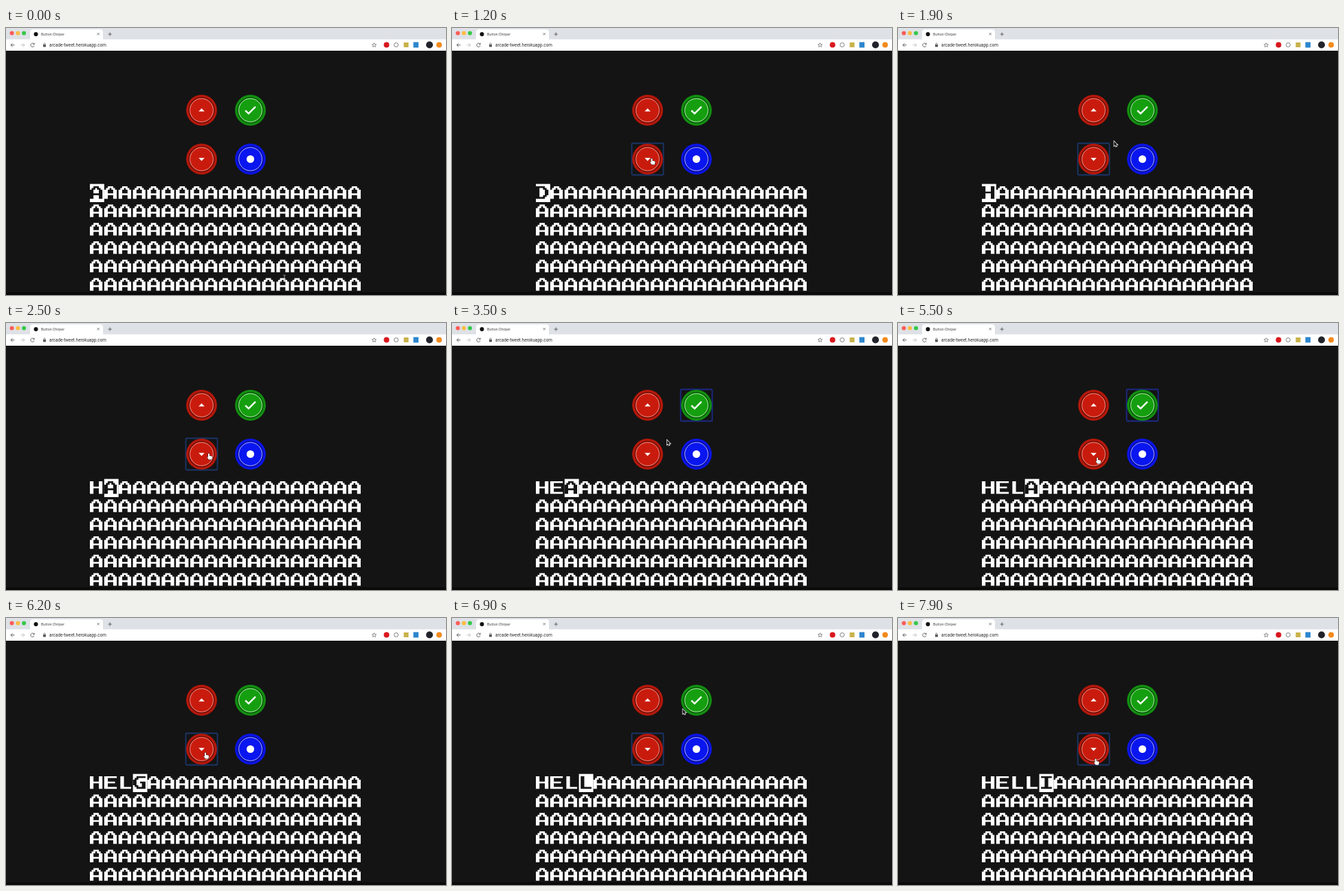
Animation, 640 px wide and 388 px high, one loop 8000 ms. Source, as an HTML page with a canvas:

```html
<!DOCTYPE html>
<html lang="en">
<head>
<meta charset="utf-8">
<title>Button Chirper</title>
<style>
html, body { margin: 0; width: 100%; height: 100%; overflow: hidden; background: #141414; }
canvas { display: block; }
</style>
</head>
<body>
<canvas id="stage" width="640" height="388"></canvas>
<script>
const ctx = document.getElementById('stage').getContext('2d');
const LOOP = 8000, DARK = '#141414';
const COLS = 19, ROWS = 6, CELL = 20.87, LINE = 26.7, DOT = CELL / 8;

// Pixel letters: v is a two-dot-wide stem, h a one-dot-high bar.
const v = (x, y, n) => [x, y, 2, n];
const h = (x, y, n) => [x, y, n, 1];
const parts = {
  A: [h(2,0,3), v(1,1,1), v(4,1,1), v(0,2,5), v(5,2,5), h(2,4,3)],
  B: [v(0,0,7), h(2,0,4), v(5,1,2), h(2,3,4), v(5,4,2), h(2,6,4)],
  C: [h(2,0,4), v(1,1,1), v(5,1,1), v(0,2,3), v(1,5,1), v(5,5,1), h(2,6,4)],
  D: [v(0,0,7), h(2,0,3), v(4,1,1), v(5,2,3), v(4,5,1), h(2,6,3)],
  E: [v(0,0,7), h(2,0,5), h(2,3,4), h(2,6,5)],
  F: [v(0,0,7), h(2,0,5), h(2,3,4)],
  G: [h(2,0,5), v(1,1,1), v(0,2,3), h(4,3,3), v(5,4,2), v(1,5,1), h(2,6,5)],
  H: [v(0,0,7), v(5,0,7), h(2,3,3)],
  I: [h(1,0,6), v(3,1,5), h(1,6,6)],
  J: [v(5,0,6), v(0,5,1), h(1,6,5)],
  K: [v(0,0,7), v(5,0,1), v(4,1,1), v(3,2,1), h(2,3,2), h(2,4,3), h(3,5,3), h(4,6,3)],
  L: [v(1,0,7), h(3,6,4)]
};
const glyphs = {};
for (const name in parts) {
  glyphs[name] = new Path2D();
  for (const r of parts[name]) glyphs[name].rect(...r.map(n => n * DOT));
}

// Each letter: time of the first click, click interval, number of clicks, time of confirmation.
const spells = [
  { start: 800, step: 160, clicks: 7, done: 2080 },
  { start: 2540, step: 150, clicks: 4, done: 3340 },
  { start: 3640, step: 120, clicks: 11, done: 5180 },
  { start: 5580, step: 105, clicks: 11, done: 7000 },
  { start: 7200, step: 95, clicks: 8, done: 9000 }
];

// Pointer stops: time, x, y.
const stops = [
  [0, 405, 359], [200, 405, 359], [650, 290, 188], [1200, 290.5, 190], [1800, 291, 190],
  [2040, 352, 124], [2130, 352, 124], [2450, 295, 190], [3050, 295, 191],
  [3290, 350, 126], [3390, 350, 126], [3590, 286, 202], [4500, 284.5, 202], [4880, 285, 202],
  [5130, 349, 125], [5220, 349, 125], [5480, 290, 196], [6680, 290, 196],
  [6980, 345, 119.5], [7030, 345, 119.5], [7170, 288, 204], [7900, 287.5, 205], [8000, 287.5, 205]
];

const buttons = [
  { x: 284.5, y: 119.5, face: '#c91b0d', rim: '#b5180b', gap: '#650d05', line: '#f0a095', icon: 'up' },
  { x: 355.5, y: 119.5, face: '#159f10', rim: '#128f10', gap: '#075207', line: '#c4efbd', icon: 'check' },
  { x: 284.5, y: 190.5, face: '#c91b0d', rim: '#b5180b', gap: '#650d05', line: '#f0a095', icon: 'down' },
  { x: 355.5, y: 190.5, face: '#0a16ef', rim: '#0a14e6', gap: '#070b8c', line: '#b9c2ff', icon: 'dot' }
];

const hand = new Path2D('M-1 0q1-1 2 0v3l3 .6q1 .3 1 1.4l-.7 3.5h-4.3l-2.5-3.4q.2-1 1.5-.2z');
const arrow = new Path2D('M0 0v6.6l1.6-1.4 1.1 2.4 1.1-.5-1.1-2.3h2.1z');

function box(x, y, w, hgt, fill, radius = 0) {
  ctx.fillStyle = fill;
  ctx.beginPath();
  ctx.roundRect(x, y, w, hgt, radius);
  ctx.fill();
}

function disc(x, y, r, fill, stroke, width = 1) {
  ctx.beginPath();
  ctx.arc(x, y, r, 0, 7);
  if (fill) { ctx.fillStyle = fill; ctx.fill(); }
  if (stroke) { ctx.strokeStyle = stroke; ctx.lineWidth = width; ctx.stroke(); }
}

function line(d, color, width = 0.9) {
  ctx.strokeStyle = color;
  ctx.lineWidth = width;
  ctx.stroke(new Path2D(d));
}

function label(text, x, y, size, color) {
  ctx.font = `${size}px Roboto, sans-serif`;
  ctx.fillStyle = color;
  ctx.fillText(text, x, y);
}

function drawBrowser() {
  box(0, 0, 640, 17, '#dee1e6');
  box(0, 16.5, 640, 16.5, '#fff');
  box(35, 2, 106, 15, '#fff', [4, 4, 0, 0]);
  ['#fc5b57', '#fdbc40', '#34c84a'].forEach((c, i) => disc(8.5 + i * 8.8, 7.5, 3, c));
  disc(43.5, 9, 3, '#111');
  label('Button Chirper', 51, 11, 5.3, '#45484c');
  line('M132.5 7l3.4 3.4m0-3.4l-3.4 3.4', '#55585c', 0.7);
  line('M148.5 9h5.4m-2.7-2.7v5.4', '#55585c');
  line('M12.5 24.8h-5.5m2.6-2.6l-2.6 2.6 2.6 2.6', '#505357');
  line('M21.5 24.8h5.5m-2.6-2.6l2.6 2.6-2.6 2.6', '#b9bbbe');
  line('M40.6 23a2.7 2.7 0 1 0 .5 2.8M41.2 21.7v2.1h-2.1', '#505357');
  box(54, 24, 4, 3.5, '#55585c', 0.4);
  line('M54.8 24v-.8a1.2 1.2 0 0 1 2.4 0v.8', '#55585c', 0.7);
  label('arcade-tweet.herokuapp.com', 63, 27, 6.4, '#2b2d30');
  line('M535.5 21.7l.9 2 2.2.2-1.7 1.5.5 2.1-1.9-1.1-1.9 1.1.5-2.1-1.7-1.5 2.2-.2z', '#55585c', 0.7);
  disc(553.5, 24.5, 4, '#d9161d');
  disc(567.5, 24.5, 3, null, '#66696d', 0.9);
  box(578.5, 21, 7, 7, '#c8b24a');
  box(592.5, 20.5, 7.5, 8, '#2d86cf');
  disc(616, 24.5, 5, '#20232a');
  disc(630, 24.5, 4, '#f28a1c');
}

function drawButton({ x, y, face, rim, gap, line: edge, icon }) {
  disc(x, y, 22.4, rim);
  disc(x, y, 18.3, face, gap, 1.3);
  disc(x, y, 16.9, null, edge, 0.9);
  ctx.save();
  ctx.translate(x, y);
  ctx.fillStyle = '#fff';
  if (icon === 'up') ctx.fill(new Path2D('M-4.3 1.8h8.6l-4.3-4.6z'));
  if (icon === 'down') ctx.fill(new Path2D('M-4.3-1.8h8.6l-4.3 4.6z'));
  if (icon === 'check') line('M-7.3.3l4.7 4.6 10-10', '#fff', 2.4);
  if (icon === 'dot') disc(0, 0, 5.5, '#fff');
  ctx.restore();
}

function drawFocus(button, color) {
  ctx.strokeStyle = color;
  ctx.lineWidth = 1.8;
  ctx.beginPath();
  ctx.roundRect(button.x - 23, button.y - 23, 46, 46, 1.5);
  ctx.stroke();
}

function drawLetter(name, col, row, color) {
  ctx.save();
  ctx.translate(122 + col * CELL, 229.9 + row * LINE);
  ctx.fillStyle = color;
  ctx.fill(glyphs[name]);
  ctx.restore();
}

function drawText(t) {
  const active = spells.findIndex(s => t < s.done);
  for (let row = 0; row < ROWS; row++) {
    for (let col = 0; col < COLS; col++) {
      let letter = 'A', color = '#fff';
      if (row === 0 && col <= active) {
        const { start, step, clicks } = spells[col];
        const n = Math.floor((t - start) / step) + 1;
        letter = 'ABCDEFGHIJKL'[Math.max(0, Math.min(clicks, n))];
        if (col === active) {
          box(122 + col * CELL, 226.6, CELL, 26.4, '#fff');
          color = DARK;
        }
      }
      drawLetter(letter, col, row, color);
    }
  }
}

function pointerAt(t) {
  const i = stops.findIndex(s => s[0] > t);
  const [t0, x0, y0] = stops[i - 1], [t1, x1, y1] = stops[i];
  const u = (t - t0) / (t1 - t0), e = u * u * (3 - 2 * u);
  return [x0 + (x1 - x0) * e, y0 + (y1 - y0) * e];
}

function drawPointer(t) {
  const [x, y] = pointerAt(t);
  ctx.save();
  ctx.translate(x, y);
  if (y > 226) {
    line('M-1.8 0q1.8 0 1.8 1.2 0-1.2 1.8-1.2M0 1v6M-1.8 8q1.8 0 1.8-1.2 0 1.2 1.8 1.2', '#aaa', 0.8);
  } else {
    const over = buttons.some(b => Math.hypot(b.x - x, b.y - y) < 22.5);
    const shape = over ? hand : arrow;
    ctx.lineWidth = over ? 0.9 : 1.4;
    ctx.strokeStyle = over ? '#111' : '#fff';
    ctx.fillStyle = over ? '#fff' : '#111';
    ctx.stroke(shape);
    ctx.fill(shape);
  }
  ctx.restore();
}

function draw(t) {
  box(0, 0, 640, 388, DARK);
  box(0, 384, 640, 4, '#0b0b0b');
  drawBrowser();
  const spell = spells.find(s => t < s.done);
  if (t >= spell.start - 60) drawFocus(buttons[2], '#1b3568');
  else if (spell !== spells[0]) drawFocus(buttons[1], '#1d2a86');
  buttons.forEach(drawButton);
  drawText(t);
  drawPointer(t);
}

const begin = performance.now();
function tick() {
  draw((performance.now() - begin) % LOOP);
  requestAnimationFrame(tick);
}
tick();
</script>
</body>
</html>
```
